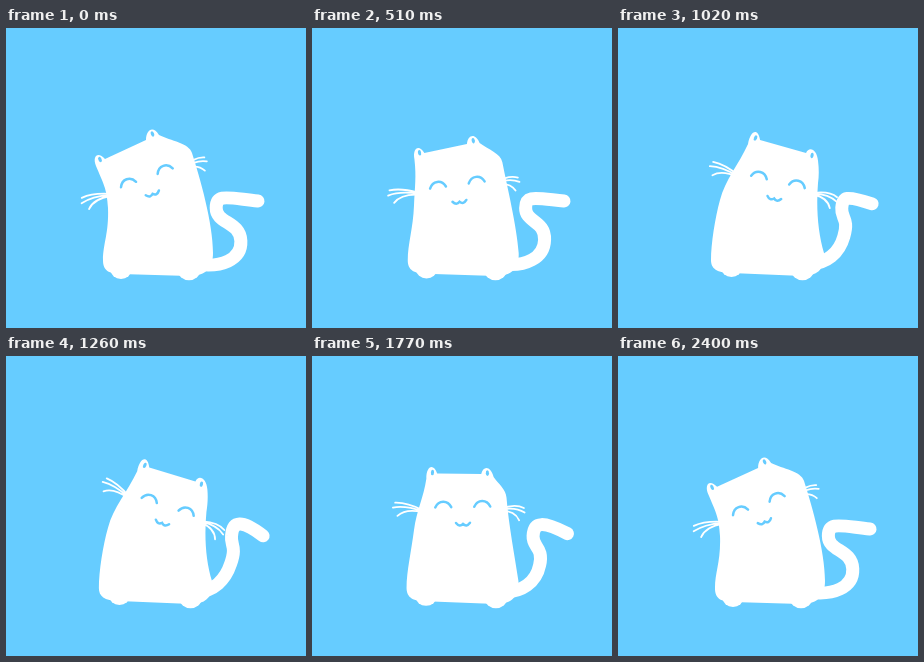
An HTML page that plays this animation: 300x300 px, repeating every 2.43 s.

```html
<!DOCTYPE html>
<html lang="en">
<head>
<meta charset="utf-8">
<title>Swaying cat</title>
<style>
  html, body { margin: 0; height: 100%; overflow: hidden; background: #6cf; }
  svg { display: block; width: 100vw; height: 100vh; }
  .line { fill: none; stroke: #fff; stroke-width: 1.8; stroke-linecap: round; }
  .face { stroke: #6cf; stroke-width: 2.5; }
</style>
</head>
<body>
<svg viewBox="0 0 300 300" fill="#fff">
  <path id="tail" class="line" style="stroke-width:13"/>
  <g class="head line">
    <path id="whiskersL" d="M-40 5Q-56 -2 -68 -1M-40 6Q-58 1 -70 4M-40 7Q-57 4 -65 12"/>
    <path id="whiskersR" d="M38 5Q52 -1 61 3M38 6Q52 2 62 7.5M38 7Q52 6 57 15.5"/>
  </g>
  <g id="torso">
    <path id="body"/>
    <g fill="#6cf">
      <ellipse id="earL" rx="1.6" ry="2.8"/>
      <ellipse id="earR" rx="1.6" ry="2.8"/>
    </g>
  </g>
  <ellipse id="footL" rx="10.5" ry="9"/>
  <ellipse id="footR" cy="243" rx="11" ry="9.2"/>
  <g class="head line face">
    <path d="M-27.5 2.5C-24 -5 -15 -5 -11.5 2.5M11.5 2.5C15 -5 24 -5 27.5 2.5"/>
    <path d="M-7 18.5Q-3.5 23 0 19.5Q3.5 23 7 18.5"/>
  </g>
</svg>
<script>
const LOOP = 2430, TAIL_LAG = 80, FLOOR = 247;
const $ = id => document.getElementById(id);
const heads = document.querySelectorAll('.head');

// The body leaning left and leaning right
const bodyLeft = 'M97 232C97 216 103 205 102 180C101 160 97 155 90 138C86 128 92 123 99 131L140 112C140 102 147 97 153 107C165 113 183 115 186 125C194 150 207 195 207 225C207 240 200 248 183 248L115 246C100 246 97 240 97 232Z';
const bodyRight = 'M93 232C93 216 97 190 102 172C107 152 121 136 130 116C132 103 140 99 142 112L188 125C191 118 199 121 200 133C201 141 201 148 200 155C198 180 200 205 206 225C208 240 200 248 185 248L113 245C98 245 93 240 93 232Z';
const tailLeft = 'M190 236C215 240 236 232 235 213C234 193 210 196 210 180';
const tailRight = 'M190 236C208 236 220 224 225 208C231 190 224 190 225 180';

// time, face x, face y, face angle, lean, body stretch, tail tip bend, whisker swing
const keys = [
  [0, 140, 147.5, -20, 0, 0, 0, 0],
  [510, 145, 154.5, -7.5, .31, 0, 0, 0],
  [750, 151.5, 155, 0, .64, 0, .05, 0],
  [1020, 160.5, 151.5, 13, 1, 0, .35, 3],
  [1260, 162.5, 148.5, 19, 1.03, 0, .85, 8],
  [1500, 161, 149, 19, 1, 0, 1, 10],
  [1980, 143.5, 148, -15, .31, .022, .25, 0]
];

const lerp = (a, b, k) => a + (b - a) * k;
const place = (id, transform) => $(id).setAttribute('transform', transform);

function mixPaths(a, b, k) {
  const target = b.match(/[\d.]+/g);
  let i = 0;
  return a.replace(/[\d.]+/g, n => lerp(+n, +target[i++], k).toFixed(2));
}

function keyAt(i) {
  const n = keys.length, turn = Math.floor(i / n);
  const [t, ...values] = keys[i - turn * n];
  return [t + turn * LOOP, ...values];
}

// Smooth periodic curve through the keys
function pose(time) {
  const t = (time + LOOP) % LOOP;
  const i = keys.findLastIndex(k => k[0] <= t);
  const [a, b, c, d] = [-1, 0, 1, 2].map(o => keyAt(i + o));
  const span = c[0] - b[0], u = (t - b[0]) / span;
  const values = b.map((from, j) => {
    const m = (c[j] - a[j]) / (c[0] - a[0]) * span;
    const n = (d[j] - b[j]) / (d[0] - b[0]) * span;
    return lerp(from, c[j], u * u * (3 - 2 * u)) + u * (1 - u) * (m * (1 - u) - n * u);
  });
  const [, x, y, angle, lean, stretch, bend, swing] = values;
  return { x, y, angle, lean, stretch, bend, swing };
}

function drawTail(lean, bend) {
  const elbow = `C${lerp(210, 226, lean)} ${lerp(165, 173, lean) - 10 * bend}`;
  const tip = `${222 + 16 * bend} ${170 - 8 * bend} ${252 + 6 * bend} ${173 + 8 * bend}`;
  $('tail').setAttribute('d', mixPaths(tailLeft, tailRight, lean) + elbow + ' ' + tip);
}

function draw(now) {
  const { x, y, angle, lean, stretch, bend, swing } = pose(now % LOOP);

  drawTail(pose(now % LOOP - TAIL_LAG).lean, bend);
  $('body').setAttribute('d', mixPaths(bodyLeft, bodyRight, lean));
  place('torso', `translate(0 ${-FLOOR * stretch}) scale(1 ${1 + stretch})`);
  place('earL', `translate(${lerp(94, 137.5, lean)} ${lerp(131.5, 110, lean)}) rotate(${lerp(-25, 22, lean)})`);
  place('earR', `translate(${lerp(146.5, 194, lean)} ${lerp(106, 127.5, lean)}) rotate(${lerp(-25, 12, lean)})`);
  $('footL').setAttribute('cx', lerp(115, 113.5, lean));
  $('footL').setAttribute('cy', lerp(242, 240, lean));
  $('footR').setAttribute('cx', lerp(183, 184.5, lean));
  place('whiskersL', `rotate(${swing} -42 5)`);
  place('whiskersR', `rotate(${swing} 40 5)`);
  for (const h of heads) h.setAttribute('transform', `translate(${x} ${y}) rotate(${angle})`);
  requestAnimationFrame(draw);
}
draw(0);
</script>
</body>
</html>
```
